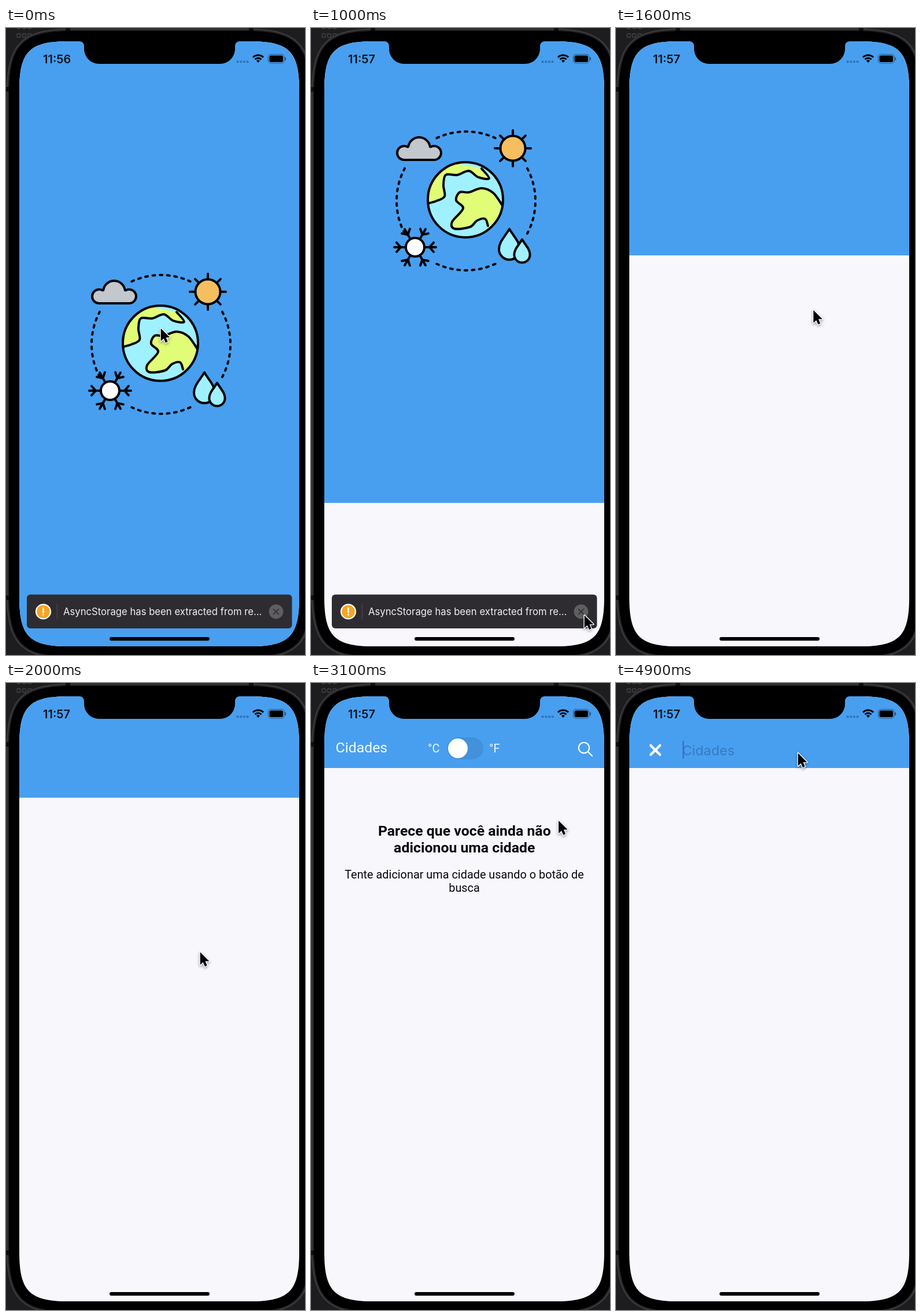
Write an HTML page with a canvas that moves like this. It is 517 by 1084 pixels and loops after 5 s.

```html
<!DOCTYPE html>
<html lang="pt-BR">
<head>
<meta charset="utf-8">
<title>Cidades</title>
<style>
  html, body { margin: 0; width: 100%; height: 100%; overflow: hidden; background: #1d1c1e; }
  canvas { display: block; }
</style>
</head>
<body>
<canvas id="stage" width="517" height="1084"></canvas>
<script>
const ctx = document.getElementById('stage').getContext('2d');
const LOOP = 5000, STEP = 100;
const BLUE = '#489ff0', PAPER = '#f8f7fb', LAND = '#e1fc77', WATER = '#a0f1ff', INK = '#08080c';
const LEFT = 23, TOP = 23, WIDTH = 484, BOTTOM = 1069, HEADER = 147, CORNER = 58.7;
const TURN = 2 * Math.PI, RAD = TURN / 360;

const clamp = v => Math.min(1, Math.max(0, v));
const mix = (a, b, k) => a + (b - a) * k;
const between = (t, from, to) => clamp((t - from) / (to - from));

// cubic-bezier(.42, 0, 1, 1), mirrored at the half for in-out
function easeIn(x) {
  let lo = 0, hi = 1;
  for (let i = 0; i < 24; i++) {
    const m = (lo + hi) / 2, n = 1 - m;
    if (1.26 * n * n * m + 3 * n * m * m + m * m * m < x) lo = m; else hi = m;
  }
  return 3 * (1 - lo) * lo * lo + lo * lo * lo;
}
const easeInOut = x => x < .5 ? easeIn(2 * x) / 2 : 1 - easeIn(2 - 2 * x) / 2;
const slide = (t, start) => easeInOut(between(t, start, start + 500));

// The panel loses a little pace around its half
function panelRise(t) {
  const pace = .442 * between(t, 302, 1200) + .216 * between(t, 1200, 1600) + .342 * between(t, 1600, 2270);
  return easeInOut(pace);
}

function paint(fill, stroke, width) {
  if (fill) { ctx.fillStyle = fill; ctx.fill(); }
  if (stroke) { ctx.strokeStyle = stroke; ctx.lineWidth = width; ctx.stroke(); }
}
function at(x, y, drawPart) {
  ctx.save();
  ctx.translate(x, y);
  drawPart();
  ctx.restore();
}
function box(x, y, w, h, r, fill, stroke, width) {
  ctx.beginPath();
  ctx.roundRect(x, y, w, h, r);
  paint(fill, stroke, width);
}
function disc(x, y, r, fill, stroke, width) {
  ctx.beginPath();
  ctx.arc(x, y, r, 0, TURN);
  paint(fill, stroke, width);
}
function arc(x, y, r, from, to, stroke, width) {
  ctx.beginPath();
  ctx.arc(x, y, r, from * RAD, to * RAD);
  paint(null, stroke, width);
}
function line(x1, y1, x2, y2, stroke, width) {
  ctx.beginPath();
  ctx.moveTo(x1, y1);
  ctx.lineTo(x2, y2);
  paint(null, stroke, width);
}
function cross(x, y, r, stroke, width) {
  line(x - r, y - r, x + r, y + r, stroke, width);
  line(x + r, y - r, x - r, y + r, stroke, width);
}
function text(str, x, y, font, fill, align = 'left') {
  ctx.font = font;
  ctx.fillStyle = fill;
  ctx.textAlign = align;
  ctx.fillText(str, x, y);
}

// Rounded rectangle whose corners flow into the sides
function squircle(x, y, w, h, r, fill, stroke, width) {
  const l = 1.45 * r, c = .206 * l, x2 = x + w, y2 = y + h;
  ctx.beginPath();
  ctx.moveTo(x + l, y);
  ctx.lineTo(x2 - l, y);
  ctx.bezierCurveTo(x2 - c, y, x2, y + c, x2, y + l);
  ctx.lineTo(x2, y2 - l);
  ctx.bezierCurveTo(x2, y2 - c, x2 - c, y2, x2 - l, y2);
  ctx.lineTo(x + l, y2);
  ctx.bezierCurveTo(x + c, y2, x, y2 - c, x, y2 - l);
  ctx.lineTo(x, y + l);
  ctx.bezierCurveTo(x, y + c, x + c, y, x + l, y);
  ctx.closePath();
  paint(fill, stroke, width);
}

// Catmull-Rom curve through "x,y" points
function curve(str) {
  const p = str.split(' ').map(s => s.split(',').map(Number));
  const path = new Path2D(), pick = i => p[Math.min(p.length - 1, Math.max(0, i))];
  path.moveTo(...p[0]);
  for (let i = 0; i < p.length - 1; i++) {
    const [a, b, c, d] = [-1, 0, 1, 2].map(k => pick(i + k));
    path.bezierCurveTo(b[0] + (c[0] - a[0]) / 6, b[1] + (c[1] - a[1]) / 6,
      c[0] - (d[0] - b[0]) / 6, c[1] - (d[1] - b[1]) / 6, ...c);
  }
  return path;
}

// Coasts are relative to the globe centre
const north = curve('-64,6 -50,2 -36,-6 -38,-25 -34,-43 -14,-43 6,-50 22,-39 41,-37 28,-54');
const south = curve('64,10 48,-12 28,-20 6,-13 -10,-13 -16,1 -4,15 -23,38 -19,50 8,47 20,36 34,33 39,45');
const northLand = new Path2D(north), southLand = new Path2D(south);
northLand.lineTo(-75, -75);
southLand.lineTo(52, 60);

function globe() {
  ctx.save();
  disc(0, 0, 65, WATER);
  ctx.clip();
  ctx.fillStyle = LAND;
  ctx.fill(northLand);
  ctx.fill(southLand);
  ctx.strokeStyle = '#000';
  ctx.lineWidth = 4;
  ctx.stroke(north);
  ctx.stroke(south);
  ctx.restore();
  disc(0, 0, 65, null, '#000', 4);
}

function cloud() {
  ctx.beginPath();
  ctx.arc(-26, 8, 12, 90 * RAD, 300 * RAD);
  ctx.arc(0, 0, 19, 188 * RAD, 352 * RAD);
  ctx.arc(26, 8, 12, -120 * RAD, 90 * RAD);
  ctx.closePath();
  paint('#c3c7ce', '#000', 4);
}

function spokes(count, drawSpoke) {
  for (let i = 0; i < count; i++) {
    ctx.save();
    ctx.rotate(i * TURN / count);
    drawSpoke();
    ctx.restore();
  }
}

function sun() {
  spokes(8, () => line(22, 0, 31, 0, '#000', 4));
  disc(0, 0, 21.5, '#f5bf60', '#000', 4);
}

function snowflake() {
  spokes(6, () => {
    line(16, 0, 36, 0, '#000', 4);
    for (const side of [-8, 8]) line(25, 0, 32, side, '#000', 4);
  });
  disc(0, 0, 16, '#fff', '#000', 4);
}

function drop(x, cy, r) {
  const top = cy - 1.94 * r;
  ctx.beginPath();
  ctx.moveTo(x, top);
  ctx.bezierCurveTo(x + r * .45, top + r * .75, x + r, cy - r * .7, x + r, cy);
  ctx.arc(x, cy, r, 0, Math.PI);
  ctx.bezierCurveTo(x - r, cy - r * .7, x - r * .45, top + r * .75, x, top);
  ctx.closePath();
  paint(WATER, '#000', 4);
}

function weatherArt() {
  ctx.setLineDash([4.2, 8.4]);
  for (let side = 0; side < 360; side += 90) {
    const gap = side % 180 ? 25 : 28;
    arc(268, 547, 120, side - gap, side + gap, '#000', 4);
  }
  ctx.setLineDash([]);
  at(187, 456, cloud);
  at(349, 456, sun);
  at(180, 627, snowflake);
  drop(343, 630.5, 18);
  drop(365, 640, 13.6);
  at(267, 545, globe);
}

function statusBar(time) {
  text(time, 64, 60.5, '600 20px Inter, sans-serif', '#08131f');
  for (let i = 0; i < 4; i++) disc(400.5 + i * 5.7, 58.3, 2.1, 'rgba(20,50,90,.42)');
  ctx.lineCap = 'butt';
  for (const r of [13, 8]) arc(436, 60, r, -134, -46, '#000', 3.1);
  arc(436, 60, 2.2, -134, -46, '#000', 4.4);
  ctx.lineCap = 'round';
  box(453.5, 45.5, 27.5, 15.5, 4.5, null, 'rgba(0,0,0,.45)', 1.2);
  box(455.5, 47.5, 23.5, 11.5, 2.8, '#000');
  box(482.3, 50.5, 1.8, 5.5, 1, 'rgba(0,0,0,.5)');
}

function titleBar() {
  const unit = '19.9px Roboto, sans-serif', pale = '#f3f9ff';
  text('Cidades', 42.5, 120, '24.8px Roboto, sans-serif', pale);
  text('°C', 202, 119.5, unit, pale);
  text('°F', 308, 119.5, unit, pale);
  box(235, 94, 63, 38, 19, '#4191db');
  disc(254, 113, 17, '#fff');
  disc(472, 112, 9.2, null, '#fff', 2.2);
  line(479, 119, 486, 126, '#fff', 2.4);
}

function searchBar(focused) {
  cross(68, 116, 8, '#fff', 4.2);
  text('Cidades', 114.5, 125, '23.4px Inter, sans-serif', '#377bbd');
  if (focused) box(115, 100, 2.6, 31, 1, '#3572cd');
}

function emptyState() {
  const bold = 'bold 24.8px Roboto, sans-serif', body = '19.86px Roboto, sans-serif';
  text('Parece que você ainda não', 265.3, 264, bold, INK, 'center');
  text('adicionou uma cidade', 265.3, 293, bold, INK, 'center');
  text('Tente adicionar uma cidade usando o botão de', 265, 337.5, body, INK, 'center');
  text('busca', 265, 361, body, INK, 'center');
}

function warning(pressed) {
  box(36, 979.5, 458.5, 58.5, 6, '#2e2c30');
  disc(64.5, 1009, 13.6, '#fff');
  disc(64.5, 1009, 11.3, '#f5a623');
  line(64.5, 1003, 64.5, 1010.5, '#fff', 2.4);
  disc(64.5, 1014.4, 1.3, '#fff');
  line(88.5, 996, 88.5, 1022, '#4a484c', 1.2);
  text('AsyncStorage has been extracted from re…', 99, 1015, '16.7px Inter, sans-serif', '#f1f1f2');
  disc(467, 1009, 12.4, pressed ? '#8d8c8f' : '#5f5e61');
  cross(467, 1009, 4.5, '#2a282c', 1.6);
}

function phone() {
  ctx.fillStyle = '#1d1c1e';
  ctx.fillRect(0, 0, 517, 1084);
  for (let i = 0; i < 6; i++) {
    box(19 + i % 3 * 9.5, i < 3 ? -5 : 10, 6, 6, 1, null, '#454447', 1.3);
  }
  squircle(1.5, 1.5, WIDTH + 43, BOTTOM + 20, CORNER + 22, '#252527', '#424244', 1.5);
  ctx.fillStyle = '#0e0e0f';
  for (const y of [102, 981]) ctx.fillRect(0, y, 6, 8);
  for (const x of [103, 420]) ctx.fillRect(x, 0, 8, 6);
  squircle(5, 5, WIDTH + 36, BOTTOM + 18 - 5, CORNER + 18, '#000');
}

function notch() {
  ctx.beginPath();
  ctx.moveTo(120, 20);
  ctx.lineTo(120, TOP);
  ctx.arcTo(135, TOP, 135, 40, 8);
  ctx.arcTo(135, 62, 265, 62, 26);
  ctx.arcTo(396, 62, 396, 40, 26);
  ctx.arcTo(396, TOP, 411, TOP, 8);
  ctx.lineTo(411, TOP);
  ctx.lineTo(411, 20);
  paint('#000');
}

// Each move: start, end, then where the tip comes to rest
const MOVES = [[100, 700, 459, 971], [700, 900, 472, 1014], [1200, 1617, 335, 464],
  [2580, 3385, 478, 112], [3700, 4400, 314, 120]];

function pointerAt(t) {
  let x = 267, y = 518;
  for (const [from, to, toX, toY] of MOVES) {
    const k = between(t, from, to);
    x = mix(x, toX, k);
    y = mix(y, toY, k);
  }
  return [x, y];
}

function pointer() {
  ctx.scale(.92, .92);
  ctx.translate(.8, 1.4);
  ctx.shadowColor = 'rgba(0,0,0,.4)';
  ctx.shadowBlur = 4;
  ctx.shadowOffsetY = 2;
  ctx.beginPath();
  ctx.moveTo(0, 0);
  for (const [x, y] of [[0, 24], [5.4, 19], [9, 27], [13, 25], [9.6, 17], [17, 17]]) ctx.lineTo(x, y);
  ctx.closePath();
  paint(null, '#fff', 3);
  ctx.shadowColor = 'transparent';
  paint('#000');
}

function draw(t) {
  const shift = (HEADER - BOTTOM) * panelRise(t);
  const listOpen = t >= 2300 && t < 4000;

  phone();
  ctx.save();
  squircle(LEFT, TOP, WIDTH, BOTTOM - TOP, CORNER, PAPER);
  ctx.clip();
  if (listOpen) emptyState();
  ctx.fillStyle = BLUE;
  ctx.fillRect(LEFT, TOP, WIDTH, BOTTOM + shift - TOP);
  at(0, shift, weatherArt);
  if (listOpen) at(WIDTH * (1 - slide(t, 2300) - slide(t, 3500)), 0, titleBar);
  if (t >= 4000) at(WIDTH * (slide(t, 4000) - 1), 0, () => searchBar(t >= 4500));
  statusBar(t < 1000 ? '11:56' : '11:57');
  if (t < 1300) warning(t >= 1100);
  box(179, 1053, 173, 6.2, 3.1, '#000');
  ctx.restore();
  notch();
  at(...pointerAt(t), pointer);
}

ctx.lineCap = ctx.lineJoin = 'round';
function frame() {
  const t = performance.now() % LOOP;
  draw(Math.floor(t / STEP) * STEP);
  requestAnimationFrame(frame);
}
frame();
</script>
</body>
</html>
```
